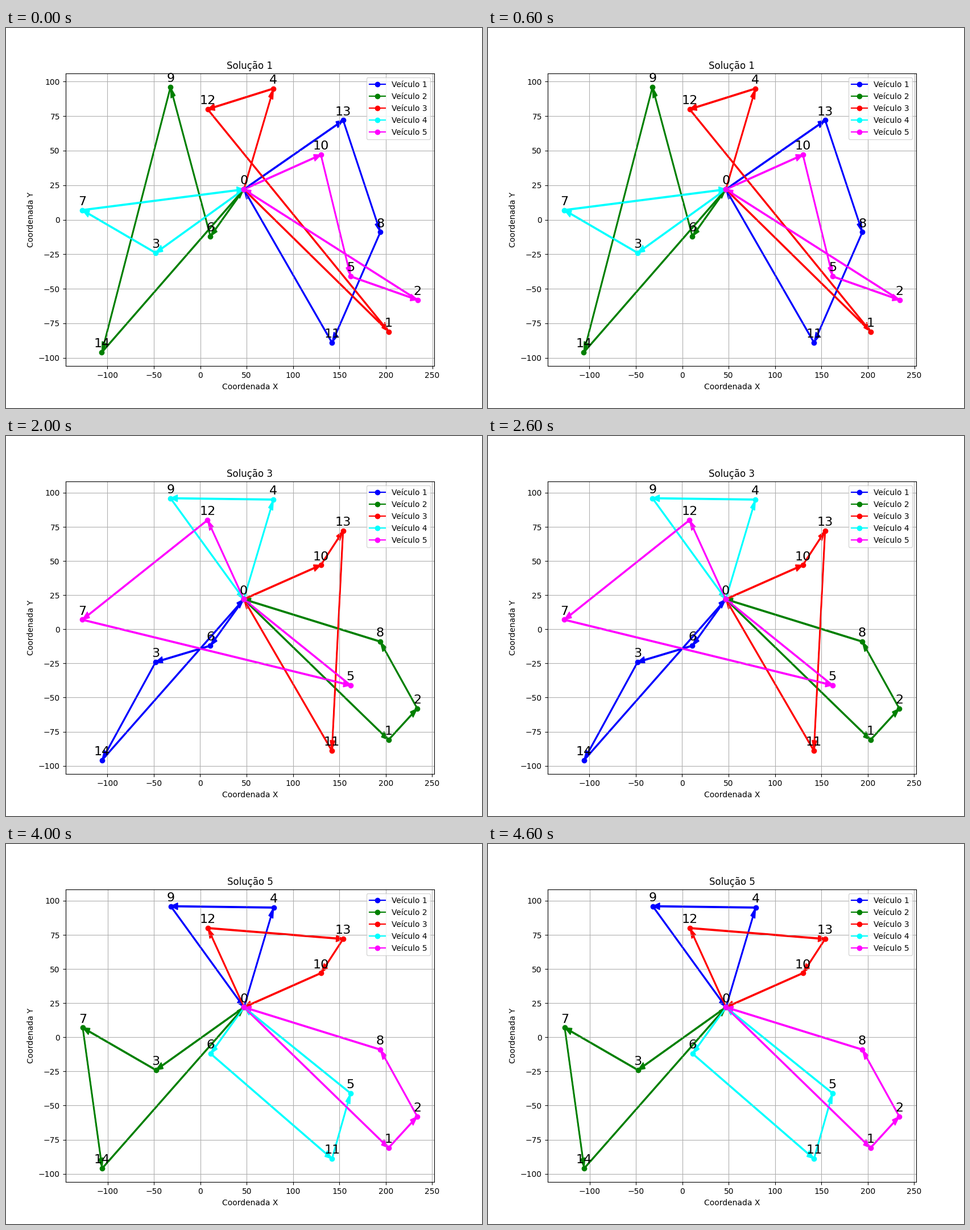
Recreate the animation shown at these times as a matplotlib script. Size 837 by 669 pixels, loop 5000 ms.

```python
import matplotlib.pyplot as plt
from matplotlib.animation import FuncAnimation

DPI = 100
WIDTH, HEIGHT = 837, 669
NODES = [(47, 22), (203, -81), (234, -58), (-48, -24), (79, 95),
         (162, -41), (11, -12), (-127, 7), (194, -9), (-32, 96),
         (130, 47), (142, -89), (8, 80), (154, 72), (-106, -96)]
COLORS = ["blue", "green", "red", "cyan", "magenta"]

# Customers visited by each vehicle; every route starts and ends at node 0.
SOLUTIONS = [
    [(13, 8, 11), (6, 9, 14), (4, 12, 1), (3, 7), (10, 5, 2)],
    [(6, 9, 10), (12, 2, 8), (4, 5), (3, 14, 7), (1, 11, 13)],
    [(6, 3, 14), (1, 2, 8), (10, 13, 11), (4, 9), (12, 7, 5)],
    [(6, 1, 2), (4, 13), (12, 9, 11), (10, 8, 5), (3, 7, 14)],
    [(4, 9), (3, 7, 14), (12, 13, 10), (6, 11, 5), (1, 2, 8)],
]

# The small margin keeps the pixel size from being rounded down.
fig, ax = plt.subplots(
    figsize=((WIDTH + 0.01) / DPI, (HEIGHT + 0.01) / DPI), dpi=DPI)


def draw_route(stops, color, label):
    points = [NODES[i] for i in (0, *stops, 0)]
    ax.plot(*zip(*points), marker="o", color=color, label=label)
    for (x0, y0), (x1, y1) in zip(points, points[1:]):
        ax.arrow(x0, y0, x1 - x0, y1 - y0, color=color, width=1,
                 head_width=5, head_length=7.5, length_includes_head=True)


def draw(step):
    ax.clear()
    for k, (stops, color) in enumerate(zip(SOLUTIONS[step], COLORS), 1):
        draw_route(stops, color, f"Veículo {k}")
    for i, (x, y) in enumerate(NODES):
        ax.text(x, y + 2, str(i), fontsize=16, ha="center", va="bottom")
    ax.set_title(f"Solução {step + 1}")
    ax.set_xlabel("Coordenada X")
    ax.set_ylabel("Coordenada Y")
    ax.legend(loc="upper right")
    ax.grid(True)


anim = FuncAnimation(fig, draw, frames=len(SOLUTIONS), interval=1000,
                     repeat=True, repeat_delay=0)
plt.show()
```
